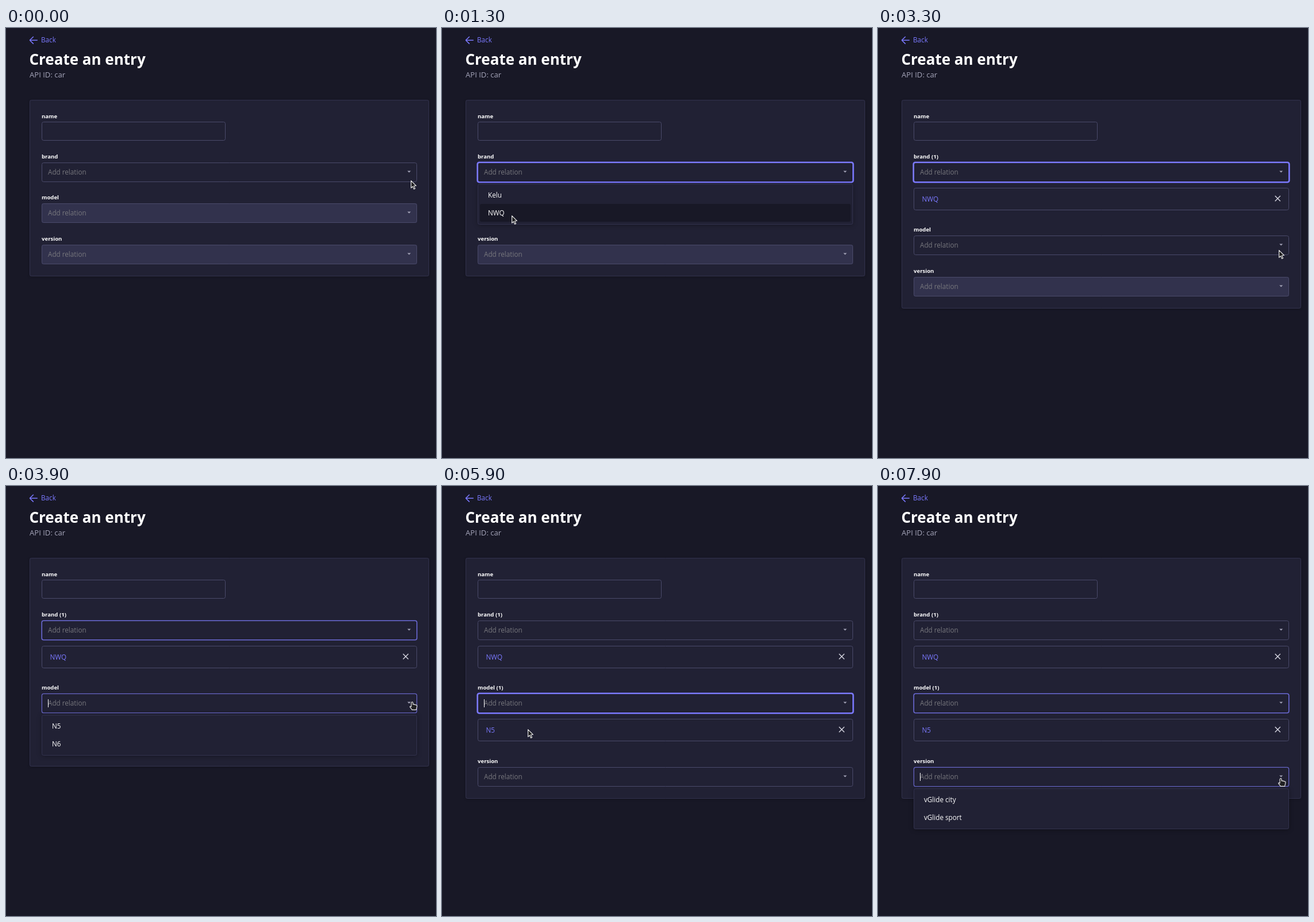
These frames come from a looping animation (748x748 px, 8 s). An HTML page with a canvas:

```html
<!DOCTYPE html>
<html lang="en">
<head>
<meta charset="utf-8">
<title>Create an entry</title>
<style>
  html, body { margin: 0; width: 100%; height: 100%; overflow: hidden; background: #181826; }
  canvas { display: block; width: 748px; height: 748px; }
</style>
</head>
<body>
<canvas id="stage" width="748" height="748"></canvas>
<script>
const ctx = document.getElementById('stage').getContext('2d');
const LOOP = 8000, STEP = 100, BLINK = 600, FADE = 250;
const C = {
  bg: '#181826', panel: '#212134', edge: '#32324d', border: '#4a4a6a',
  accent: '#7b79ff', soft: '#a5a5ba', hint: '#77777d', white: '#ffffff',
  dark: '#202022', light: '#e8e8e8'
};
const LEFT = 62, WIDE = 653, FIELD = 34, PITCH = 71.4, CHIP = 56, ROW = 31;

// Each field opens, then its choice is pressed one step before it is picked.
const fields = [
  { label: 'brand', open: 500, pick: 2500, options: ['Kelu', 'NWQ'], choice: 'NWQ' },
  { label: 'model', open: 3900, pick: 5800, options: ['N5', 'N6'], choice: 'N5' },
  { label: 'version', open: 7900, pick: Infinity, options: ['vGlide city', 'vGlide sport'] }
];
fields.forEach((f, i) => {
  f.enabled = i ? fields[i - 1].pick : 0;
  f.blur = i < 2 ? fields[i + 1].open : Infinity;
});

// Pointer moves; sag bends the way downwards.
const home = { x: 704, y: 265 };
const moves = [
  { from: 0, to: 300, x: 706, y: 253, sag: 0 },
  { from: 800, to: 1300, x: 121, y: 326, sag: 0 },
  { from: 1300, to: 2400, x: 133, y: 316, sag: 0 },
  { from: 2800, to: 3300, x: 697, y: 386, sag: 80 },
  { from: 3400, to: 3700, x: 707, y: 375, sag: 0 },
  { from: 4200, to: 4800, x: 164, y: 435, sag: 10 },
  { from: 4800, to: 5300, x: 149, y: 423, sag: 0 },
  { from: 6200, to: 7100, x: 693, y: 513, sag: 55 },
  { from: 7100, to: 7400, x: 701, y: 508, sag: 0 }
];

const clamp = v => Math.max(0, Math.min(1, v));
const ease = p => p * p * (3 - 2 * p);

function pointerAt(t) {
  let { x, y } = home;
  for (const m of moves) {
    const p = ease(clamp((t - m.from) / (m.to - m.from)));
    x += (m.x - x) * p;
    y += (m.y - y) * p + m.sag * Math.sin(Math.PI * p);
  }
  return { x: Math.round(x), y: Math.round(y) };
}

const pressing = (f, t) => t >= f.pick - STEP && t < f.pick;

function focusLevel(f, t) {
  if (t < f.open) return 0;
  if (t >= f.blur) return clamp(1 - (t - f.blur + STEP) / FADE);
  if (pressing(f, t)) return 1 - STEP / FADE;
  return t < f.pick ? clamp((t - f.open + STEP) / FADE) : clamp((t - f.pick + 2 * STEP) / FADE);
}

function caretOn(f, t) {
  if (t < f.open || t >= f.blur || pressing(f, t)) return false;
  return Math.floor((t - (t < f.pick ? f.open : f.pick)) / BLINK) % 2 === 0;
}

function text(s, x, y, size, color, weight = 400) {
  ctx.font = `${weight} ${size}px "Open Sans", "Noto Sans", sans-serif`;
  ctx.fillStyle = color;
  ctx.fillText(s, x, y);
}

function box(x, y, w, h, fill, stroke) {
  ctx.beginPath();
  ctx.roundRect(x, y, w, h, 3);
  ctx.fillStyle = fill;
  ctx.fill();
  ctx.shadowColor = 'transparent';
  if (stroke) frame(x, y, w, h, stroke, 1, 0);
}

function frame(x, y, w, h, color, width, grow) {
  const o = 0.5 - grow;
  ctx.beginPath();
  ctx.roundRect(x + o, y + o, w - 2 * o, h - 2 * o, 3);
  ctx.strokeStyle = color;
  ctx.lineWidth = width;
  ctx.stroke();
}

function shadow(blur, alpha) {
  ctx.shadowColor = `rgba(3, 3, 5, ${alpha})`;
  ctx.shadowBlur = blur;
  ctx.shadowOffsetY = 1;
}

function line(color, width, x1, y1, x2, y2) {
  ctx.beginPath();
  ctx.moveTo(x1, y1);
  ctx.lineTo(x2, y2);
  ctx.strokeStyle = color;
  ctx.lineWidth = width;
  ctx.stroke();
}

function drawRing(y, level) {
  const spread = level * level;
  ctx.globalAlpha = 0.4 + 0.6 * level;
  frame(LEFT, y, WIDE, FIELD, C.accent, 1 + 1.6 * spread, 0.8 * spread);
  ctx.globalAlpha = 1;
}

function drawChip(name, y) {
  box(LEFT, y, WIDE, 39, C.panel, C.border);
  text(name, 76.5, y + 23.5, 11.7, C.accent);
  const x = 695.3, mid = y + 18.7, r = 4.6;
  for (const s of [r, -r]) line('#d5d5e0', 1.4, x - r, mid - s, x + r, mid + s);
}

function drawField(f, y, t) {
  const picked = t >= f.pick, level = focusLevel(f, t);
  text(f.label + (picked ? ' (1)' : ''), LEFT, y - 7, 9.6, C.white, 700);
  box(LEFT, y, WIDE, FIELD, t >= f.enabled ? C.panel : C.edge, C.border);
  if (level > 0) drawRing(y, level);
  text('Add relation', 73, y + 21, 11.7, C.hint);
  if (caretOn(f, t)) {
    ctx.fillStyle = C.white;
    ctx.fillRect(73, y + 10, 1, 14);
  }
  ctx.beginPath();
  ctx.moveTo(698.2, y + 14.6);
  ctx.lineTo(704.2, y + 14.6);
  ctx.lineTo(701.2, y + 17.6);
  ctx.fillStyle = C.soft;
  ctx.fill();
  if (picked) drawChip(f.choice, y + 44);
}

function drawMenu(f, y, tip) {
  const top = y + 41;
  shadow(8, 0.3);
  box(LEFT, y + 37, WIDE, 71, C.panel, C.edge);
  f.options.forEach((s, i) => {
    if (Math.floor((tip.y - 5 - top) / ROW) === i) box(66, top + ROW * i, 645, ROW, C.bg);
    text(s, 80, top + 20 + ROW * i, 11.7, C.white);
  });
}

function outline(shape) {
  const path = new Path2D(shape);
  ctx.fillStyle = C.dark;
  ctx.fill(path);
  ctx.strokeStyle = C.light;
  ctx.lineWidth = 1.15;
  ctx.lineJoin = 'round';
  ctx.stroke(path);
}

const drawArrow = () => outline('M.6 .6V13.2L3.5 10.6L5.5 15.3L7.6 14.4L5.6 9.8L9.4 9.5Z');
const drawHand = () => outline(
  'M-2 2Q-.3 -.8 1 2V5Q2.3 4 3.4 5.4Q4.7 4.6 5.6 6Q8 5.6 8 8L6.6 14.4H-.6L-4.2 9.6Q-4.8 7.5 -2 9Z');

function drawBlocked() {
  [7.6, 6.7, 5.2, 4.1].forEach((r, i) => {
    ctx.beginPath();
    ctx.arc(0.3, 0.3, r, 0, Math.PI * 2);
    ctx.fillStyle = i % 2 ? C.dark : C.light;
    ctx.fill();
  });
  line(C.light, 1.3, -2.9, 3.5, 3.5, -2.9);
}

function drawPointer(tip, blocked, hand) {
  ctx.save();
  ctx.translate(tip.x, tip.y);
  if (blocked) drawBlocked();
  else if (hand) drawHand();
  else drawArrow();
  ctx.restore();
}

function draw(t) {
  const tip = pointerAt(t);
  ctx.fillStyle = C.bg;
  ctx.fillRect(0, 0, 748, 748);

  line(C.accent, 1.5, 41.6, 21.3, 54.8, 21.3);
  for (const dy of [-6.3, 6.3]) line(C.accent, 1.5, 47.8, 21.3 + dy, 41.3, 21.3);
  text('Back', 61, 25, 11.7, C.accent);
  text('Create an entry', 40.5, 63.5, 26, C.white, 700);
  text('API ID: car', 41, 86, 13.1, C.soft);

  const chips = fields.filter(f => t >= f.pick).length;
  shadow(4, 0.2);
  box(41, 125, 695, 307 + CHIP * chips, C.panel, C.edge);
  text('name', LEFT, 156.5, 9.6, C.white, 700);
  box(LEFT, 163, 320, 33, C.panel, C.border);

  let y = 234, menu = null, hand = false;
  for (const f of fields) {
    const top = Math.round(y);
    drawField(f, top, t);
    if (t >= f.open && t < f.pick) menu = [f, top];
    if (t >= f.enabled && Math.hypot(tip.x - 701, tip.y - top - 16.5) < 8) hand = true;
    y += PITCH + (t >= f.pick ? CHIP : 0);
  }
  if (menu) drawMenu(...menu, tip);
  drawPointer(tip, fields.some(f => pressing(f, t)), hand);
}

const start = performance.now();
function tick() {
  const t = (performance.now() - start) % LOOP;
  draw(Math.floor(t / STEP) * STEP);
  requestAnimationFrame(tick);
}
tick();
</script>
</body>
</html>
```
